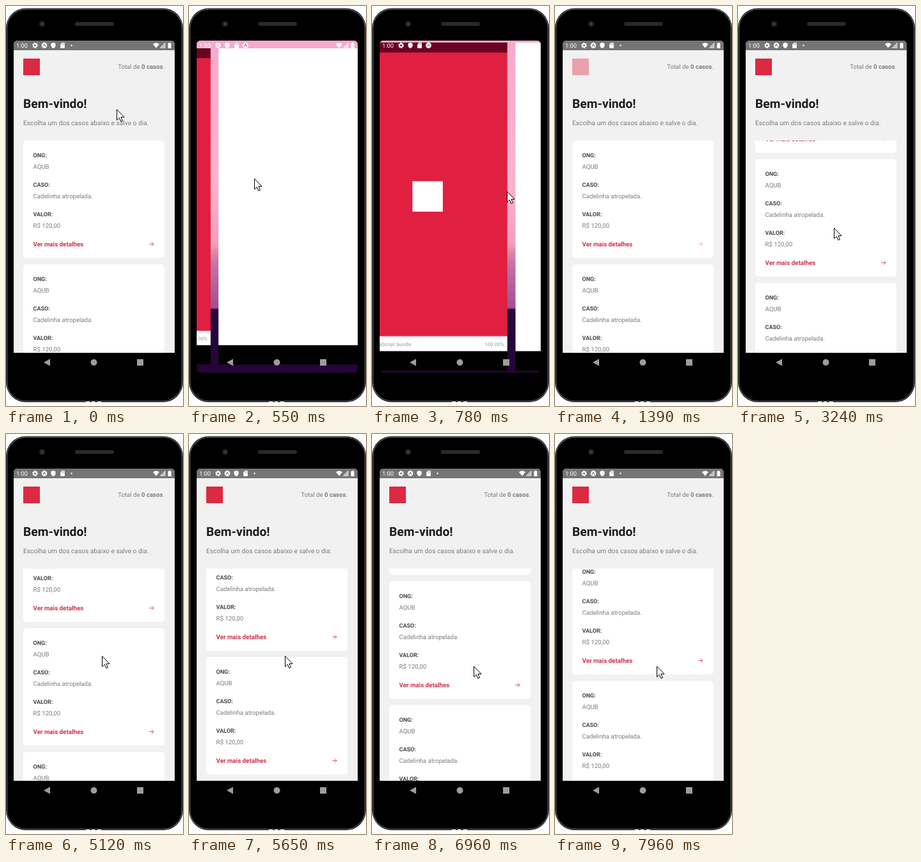
Write an HTML page that moves like this. It is 277 px wide and 624 px high and loops after 8 s.

```html
<!DOCTYPE html>
<html lang="pt-BR">
<head>
<meta charset="utf-8">
<title>Lista de casos</title>
<style>
  html, body { margin: 0; width: 100%; height: 100%; overflow: hidden; background: #fff; }
  svg { display: block; width: 100%; height: 100%; font-family: Roboto, sans-serif; text-rendering: geometricPrecision; }
  .label { font-size: 9px; font-weight: 700; fill: #47474f; }
  .value { font-size: 9.63px; fill: #7c7c84; }
  .link { font-size: 9.75px; font-weight: 700; fill: #d2304a; }
  .title { font-size: 19.3px; font-weight: 700; fill: #1a1a20; }
  .intro { font-size: 10.22px; fill: #7c7c84; }
  .loading { font-size: 8px; fill: #999; }
  .arrow { fill: none; stroke: #d2485c; stroke-width: .9; stroke-linecap: round; stroke-linejoin: round; }
</style>
</head>
<body>
<svg viewBox="0 0 277 624">
  <defs>
    <clipPath id="screenClip"><rect x="12" y="54" width="252" height="518" rx="6"/></clipPath>
    <clipPath id="listClip"><rect x="12" y="210" width="252" height="331"/></clipPath>
    <linearGradient id="wallpaper" gradientUnits="userSpaceOnUse" x1="0" y1="54" x2="0" y2="572">
      <stop offset="0" stop-color="#f5aace"/>
      <stop offset=".43" stop-color="#fbb3cd"/>
      <stop offset=".62" stop-color="#ee9dbd"/>
      <stop offset=".63" stop-color="#e78ba2"/>
      <stop offset=".67" stop-color="#c574a6"/>
      <stop offset=".805" stop-color="#a24e92"/>
      <stop offset=".81" stop-color="#29083f"/>
      <stop offset="1" stop-color="#230536"/>
    </linearGradient>
    <path id="shield" d="M0-4.5 3.6-3V0Q3.4 3.2 0 4.5Q-3.4 3.2-3.6 0V-3Z"/>
    <g id="sdCard"><path d="M-1-4.3H3.4V4.3H-3.4V-1.8Z"/><path d="M-.8-3V-1.2M.8-3V-1.2M2.2-3V-1.2" stroke="#777" stroke-width=".7"/></g>
    <g id="badge"><circle r="4.4"/><path d="M-2 2 0-2 2 2" fill="none" stroke="#777" stroke-width="1.1"/></g>
  </defs>

  <!-- Phone body -->
  <rect y="3.5" width="277" height="614.5" rx="31"/>
  <rect x="1.5" y="5" width="274" height="611.5" rx="29.5" fill="none" stroke="#56585c" stroke-width="1.4"/>
  <path d="M125 618h6M134 618h5M143 618h6" stroke="#fff" stroke-width="2"/>
  <circle cx="56.5" cy="28" r="4.5" fill="#242426"/>
  <circle cx="56.5" cy="28" r="2" fill="#3d3d42"/>
  <rect x="108" y="25" width="61" height="6" rx="3" fill="#2a2a2a"/>

  <g clip-path="url(#screenClip)">
    <rect x="12" y="54" width="252" height="518"/>
    <rect x="12" y="54" width="252" height="487" fill="#f1f1f1"/>
    <rect x="12" y="54" width="252" height="15" fill="#757575"/>
    <rect class="late" x="27" y="82" width="26" height="26" fill="#dc2a44"/>
    <text class="value" x="248" y="98" text-anchor="end">Total de <tspan font-weight="700">0 casos</tspan>.</text>
    <text class="title" x="27" y="158.7">Bem-vindo!</text>
    <text class="intro" x="27" y="186">Escolha um dos casos abaixo e salve o dia.</text>
    <g clip-path="url(#listClip)"><g id="list"></g></g>

    <!-- Task switcher -->
    <g id="switcher">
      <rect x="12" y="54" width="252" height="518" fill="url(#wallpaper)"/>
      <g id="tasks">
        <rect x="12" y="54" width="252" height="518"/>
        <rect x="12" y="54" width="252" height="487" fill="#fff"/>
        <g transform="translate(-265)">
          <rect x="12" y="54" width="252" height="518"/>
          <rect x="12" y="54" width="252" height="487" fill="#e01f41"/>
          <rect x="12" y="54" width="252" height="16" fill="#6a0220"/>
          <rect x="114" y="273" width="48" height="48" fill="#fff"/>
          <rect x="12" y="517.5" width="252" height="23.5" fill="#fff"/>
          <text class="loading" x="18" y="533">Building JavaScript bundle</text>
          <text class="loading" x="258.5" y="533" text-anchor="end">100.00%</text>
        </g>
      </g>
    </g>

    <!-- Status bar -->
    <g fill="#fff">
      <text x="16" y="65" font-size="9.3">1:00</text>
      <circle cx="45.5" cy="61.5" r="2.5" fill="none" stroke="#fff" stroke-width="1.8"/>
      <circle cx="45.5" cy="61.5" r="3.8" fill="none" stroke="#fff" stroke-width="1.2" stroke-dasharray="2 1.98"/>
      <g id="homeIcons">
        <use href="#badge" x="60" y="61.5"/><use href="#shield" x="74" y="61.5"/><use href="#sdCard" x="88.5" y="61.5"/>
        <circle cx="102.5" cy="61.5" r="1.2"/>
      </g>
      <g id="taskIcons">
        <use href="#shield" x="60" y="61.5"/><use href="#sdCard" x="74.5" y="61.5"/><use href="#badge" x="88.5" y="61.5"/>
      </g>
      <path d="M230 59.5Q235 55.5 240 59.5L235 65.5Z"/>
      <path d="M241.5 65.2 249 57.5V65.2Z" fill-opacity=".5" stroke="#fff" stroke-width=".7"/>
      <path d="M253.5 58H255V57H257V58H258.5V66H253.5Z"/>
    </g>

    <!-- Navigation bar -->
    <g fill="#9d9d9d">
      <path d="M59 556 69 550.5V561.5Z"/>
      <circle cx="137.5" cy="556" r="5"/>
      <rect x="205" y="551" width="10" height="10"/>
    </g>
  </g>

  <path id="cursor" d="M.5 .5V17L4.3 13.4 6.8 19.3 9.4 18.2 6.9 12.4H12Z" fill="#fff" stroke="#000"/>
</svg>
<script>
const LOOP = 8000, STEP = 76, CARD_PITCH = 193, TASK_PITCH = 265;
const $ = id => document.getElementById(id);

const fields = [['ONG:', 'AQUB'], ['CASO:', 'Cadelinha atropelada.'], ['VALOR:', 'R$ 120,00']];
const card = i => `<g transform="translate(0 ${i * CARD_PITCH})">
  <rect x="27" y="210" width="221" height="183" rx="5" fill="#fff"/>
  ${fields.map(([label, value], row) => `
    <text class="label" x="42.5" y="${235.5 + row * 46.2}">${label}</text>
    <text class="value" x="42.5" y="${254 + row * 46.2}">${value}</text>`).join('')}
  <text class="link" x="42.5" y="375">Ver mais detalhes</text>
  <path class="arrow late" d="M224.5 371.5H231M228 368.5 231 371.5 228 374.5"/>
</g>`;
$('list').innerHTML = [0, 1, 2].map(card).join('');

const flick = p => 1 - (1 - p) ** 3.75;
const linear = p => p;

// Each move is [begin ms, end ms, ...values to reach], played in held steps.
function track(el, start, moves, style, ease = flick) {
  const key = (ms, values) => ({ offset: ms / LOOP, easing: 'step-end', ...style(...values) });
  const frames = [key(0, start)];
  let from = start;
  for (const [begin, end, ...to] of moves) {
    const last = Math.round((end - begin) / STEP);
    for (let k = 0; k <= last; k++) {
      const p = ease((k + 1) / (last + 1));
      const ms = begin + (end - begin) * k / (last || 1);
      frames.push(key(ms, from.map((v, i) => v + (to[i] - v) * p)));
    }
    from = to;
  }
  frames.push(key(LOOP, from));
  el.animate(frames, { duration: LOOP, iterations: Infinity });
}
const cut = (ms, ...values) => [ms, ms, ...values];
const fade = opacity => ({ opacity });
const shift = (x, y) => ({ transform: `translate(${Math.round(x)}px, ${Math.round(y)}px)` });

track($('list'), [0], [
  [3240, 3470, 248], [4100, 4250, 107], [4650, 4800, 0], [5120, 5200, 108],
  [5350, 5650, 248], [6810, 6960, 173], [7420, 7960, 18]
], y => shift(0, -y));

track($('cursor'), [173, 161], [
  [320, 550, 102, 269], [630, 930, 215, 290], cut(1010, 364, 277), [2310, 2690, 150, 346], [6500, 6580, 159, 362]
], shift);
track($('cursor'), [1], [cut(1010, 0), cut(2310, 1)], fade);

track($('tasks'), [0, 1], [[320, 550, 29.4, .951], [630, 1010, TASK_PITCH, 1]],
  (x, scale) => ({ transform: `translate(138px, 300px) scale(${scale}) translate(${x - 138}px, -300px)` }));

const switching = [cut(320, 1), cut(1390, 0)];
track($('switcher'), [0], switching, fade);
track($('taskIcons'), [0], switching, fade);
track($('homeIcons'), [0], switching, on => fade(1 - on));

document.querySelectorAll('.late').forEach(el =>
  track(el, [1], [cut(1010, .2), [1390, 1630, 1]], fade, linear));
</script>
</body>
</html>
```
